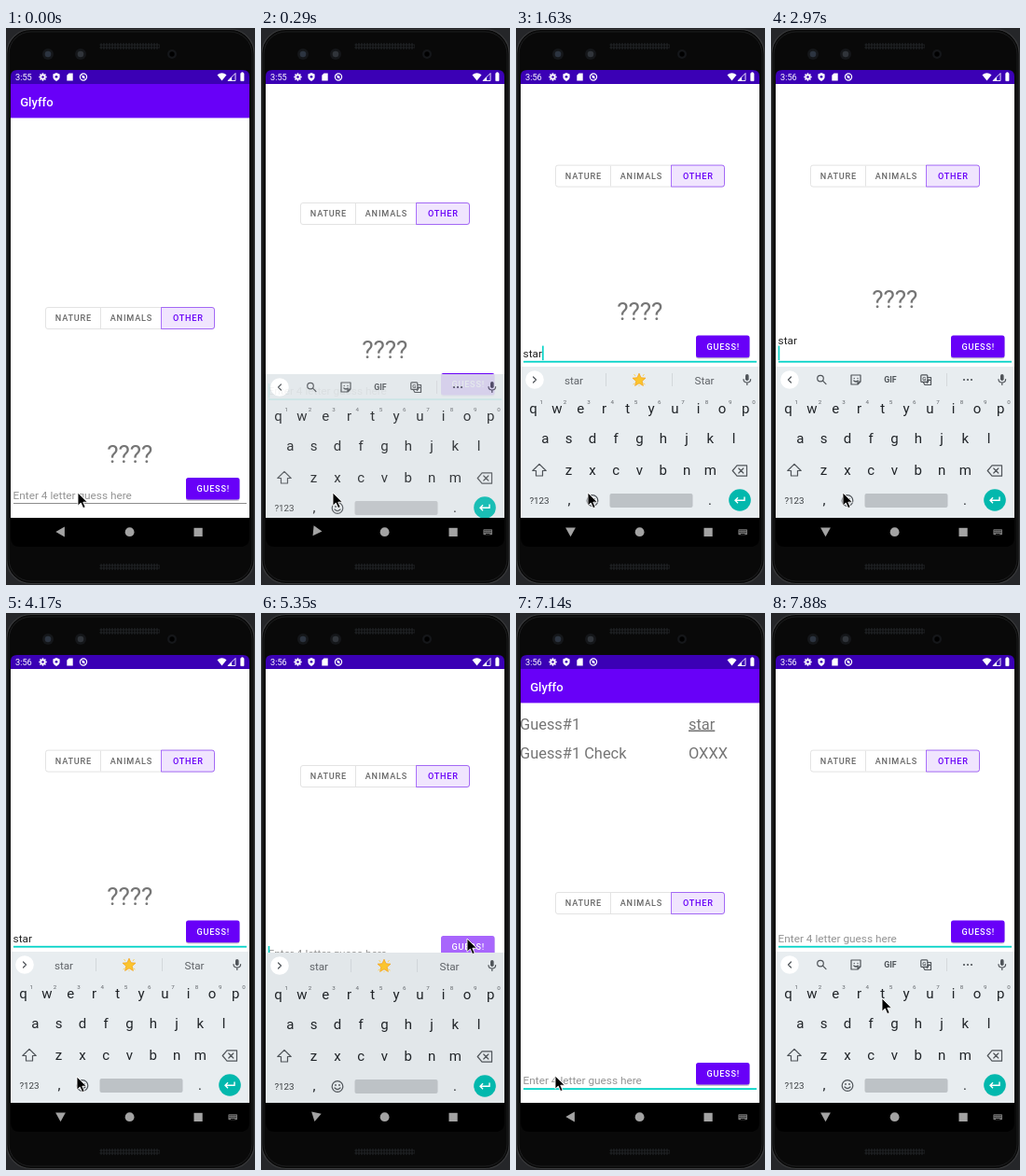
Write an HTML page that moves like this. It is 267x597 px and loops after 8000 ms.

```html
<!DOCTYPE html>
<html lang="en">
<head>
<meta charset="utf-8">
<title>Word guessing app</title>
<style>
  html, body { margin: 0; width: 100%; height: 100%; overflow: hidden; background: #252629; }
  svg { display: block; width: 267px; height: 597px; }
  text { font-family: Roboto, "Noto Sans", sans-serif; white-space: pre; }
  .mid { text-anchor: middle; }
  .caps { font-size: 9.12px; font-weight: 500; letter-spacing: .81px; text-anchor: middle; }
  .entry { font-size: 11.8px; }
  .row { font-size: 16.4px; fill: #757575; }
  .key { font-size: 15px; fill: #202428; text-anchor: middle; }
  .hint { font-size: 6.2px; fill: #5f6368; text-anchor: middle; }
  .word { font-size: 11.7px; fill: #5f6368; text-anchor: middle; }
  .line { fill: none; stroke: #4f5459; stroke-width: 1.2; stroke-linejoin: round; stroke-linecap: round; }
</style>
</head>
<body>
<svg id="stage" viewBox="0 0 267 597"></svg>
<script>
const PURPLE = '#6800f8', TEAL = '#03d3c7', LOOP = 8000;

const text = (x, y, s, cls = '', more = '') => `<text x="${x}" y="${y}" class="${cls}" ${more}>${s}</text>`;
const rect = (x, y, w, h, fill, more = '') => `<rect x="${x}" y="${y}" width="${w}" height="${h}" fill="${fill}" ${more}/>`;
const dot = (x, y, r, fill, more = '') => `<circle cx="${x}" cy="${y}" r="${r}" fill="${fill}" ${more}/>`;
const path = (d, more = 'class="line"') => `<path d="${d}" ${more}/>`;

function body() {
  const grille = y => rect(100, y, 65, 7, 'url(#mesh)', 'rx="3.5"');
  const lens = (x, r, fill) => dot(x, 28, r, '#15171a') + dot(x, 28, r * .55, fill);
  return rect(0, 0, 267, 597, '#252629')
    + rect(.8, 1.5, 265.4, 594, '#090909', 'rx="26" stroke="#3a3b3d" stroke-width="1.2"')
    + rect(3, 4, 261, 589, 'none', 'rx="24" stroke="#1d1e1f"')
    + grille(16) + grille(574)
    + lens(45, 6, '#2c3440') + lens(80, 6, '#30343a') + lens(178, 5, '#000');
}

function statusBar() {
  const white = 'fill="#fff"';
  const teeth = [0, 45, 90, 135].map(a => rect(38.7, 48.3, 1.6, 8.4, '#fff', `transform="rotate(${a} 39.5 52.5)"`)).join('');
  return path('M5 60v-8q0-7 7-7h242q7 0 7 7v8z', 'fill="#3b00b5"')
    + text(10, 55.9, '3:55', '', 'id="clock" font-size="9.2" fill="#fff"')
    + teeth + dot(39.5, 52.5, 3, '#fff') + dot(39.5, 52.5, 1.3, '#3b00b5')
    + path('M54 48l3.6 1.5v2.8q0 3-3.6 4.8q-3.6-1.8-3.6-4.8v-2.8z', white) + dot(54, 52.3, 1.4, '#3b00b5')
    + path('M67.5 48.5h4.2v8h-6.4v-5.8z', white)
    + dot(83, 52.5, 3.6, 'none', 'stroke="#fff" stroke-width="1.2"') + dot(83, 52.5, 1.4, '#fff')
    + path('M80.5 50l5 5', 'stroke="#fff"')
    + path('M231.5 56.5l-5-6.2q5-4.2 10 0z', white)
    + path('M246 48.5v8h-8z', 'fill="none" stroke="#fff" stroke-width=".9"') + path('M242 52.5v4h-4z', white)
    + path('M251.8 48.6h.8v-.8h1.6v.8h.8v8h-3.2z', 'fill="#fff" stroke="#fff" stroke-width=".8"');
}

function appWindow() {
  return rect(5, 60, 256, 620, '#fff')
    + rect(5, 60, 256, 36.4, PURPLE)
    + text(15.2, 83.5, 'Glyffo', '', 'font-size="13.1" font-weight="500" fill="#fff"')
    + '<g id="result">' + text(4, 124.5, 'Guess#1', 'row') + text(185, 124.5, 'star', 'row', 'text-decoration="underline"')
    + text(4, 155.5, 'Guess#1 Check', 'row') + text(185, 155.5, 'OXXX', 'row') + '</g>'
    + rect(42.5, 299.5, 181, 23, '#fff', 'rx="2.5" stroke="#e3e3e3"') + rect(101, 300, 1, 22, '#e3e3e3')
    + path('M166.5 299.5h54.5q2.5 0 2.5 2.5v18q0 2.5-2.5 2.5h-54.5z', `fill="#f0e5fe" stroke="${PURPLE}" stroke-opacity=".6" stroke-width=".9"`)
    + text(72.4, 314.3, 'NATURE', 'caps', 'fill="#686868"') + text(134.4, 314.3, 'ANIMALS', 'caps', 'fill="#686868"')
    + text(195.4, 314.3, 'OTHER', 'caps', `fill="${PURPLE}"`)
    + text(132.8, 465.8, '????', 'mid', 'id="marks" font-size="26" fill="#757575"')
    + text(7.6, 505, '', 'entry', 'id="line1"')
    + rect(0, 493, 1.6, 15.5, TEAL, 'id="caret"')
    + rect(8, 509, 250, 1, '#8c8c8c', 'id="rule"')
    + rect(193, 483.3, 57.5, 23.6, '#000', 'rx="2.5" opacity=".2"')
    + rect(193, 482, 57.5, 23.6, PURPLE, 'rx="2.5" id="button"')
    + text(222.2, 497.2, 'GUESS!', 'caps', 'fill="#fff"');
}

function keyRow(letters, x0, y) {
  return [...letters].map((c, i) => text(x0 + i * 25.3, y, c, 'key')).join('');
}

function keyboard() {
  const hints = [...'1234567890'].map((c, i) => text(27.3 + i * 25.3, 403, c, 'hint')).join('');
  const tools = dot(53, 375.6, 3.3, 'none', 'class="line"') + path('M55.5 378.2l3.5 3.5')
    + path('M86 372h10v7l-3 3h-7zM96 379h-3v3') + dot(89.2, 375.5, .7, '#4f5459') + dot(93, 375.5, .7, '#4f5459') + path('M88.8 378q2.2 2 4.4 0')
    + text(128, 380, 'GIF', 'mid', 'font-size="8.8" font-weight="700" fill="#4f5459"')
    + rect(160.8, 371.8, 7, 7.6, 'none', 'rx="1" class="line"') + text(164.3, 377.8, 'G', 'mid', 'font-size="6" font-weight="700" fill="#4f5459"')
    + path('M168 374.5h3.5v8h-6.5l-1.5-2.5M168 377.5h2.5M169.3 376.5q0 2-2 4')
    + rect(188, 370, .8, 14, '#d0d4d8')
    + [207, 211, 215].map(x => dot(x, 377, 1.1, '#4f5459')).join('');
  const words = text(62, 381.8, '', 'word', 'id="w0"') + text(132, 381.8, '', 'word', 'id="w1"') + text(202, 381.8, '', 'word', 'id="w2"')
    + rect(96, 370, .8, 14, '#cdd2d6') + rect(167, 370, .8, 14, '#cdd2d6')
    + '<g id="star">' + path('M132 370.2l2 4.6 5 .4-3.8 3.3 1.2 4.9-4.4-2.6-4.4 2.6 1.2-4.9-3.8-3.3 5-.4z', 'fill="#fbc52d" stroke="#f5a623" stroke-width=".8" stroke-linejoin="round"')
    + path('M126.5 371l1.5 2M137.5 371l-1.5 2M125.5 382l2-1.2M138.5 382l-2-1.2M132 384v-1', 'stroke="#f9d45c" stroke-width="1"') + '</g>';
  return rect(5, 363, 256, 180, '#e8edf0', 'id="panel"')
    + dot(20, 377, 9.8, '#fff') + path('M21.5 374l-3 3 3 3', 'class="line" id="chevron"')
    + `<g id="tools">${tools}</g><g id="words">${words}</g>`
    + rect(246, 371, 3.6, 7, '#4f5459', 'rx="1.8"') + path('M244 376.5q0 3.5 3.8 3.5t3.8-3.5M247.8 380v2.5')
    + keyRow('qwertyuiop', 18.6, 412.5) + hints
    + keyRow('asdfghjkl', 31.3, 445) + keyRow('zxcvbnm', 56.6, 478.5)
    + path('M25 467.3l-7.2 7.2h3.7v5.5h7v-5.5h3.7z')
    + path('M237 468.8h10.5v11.4h-10.5l-4.8-5.7zM238.8 472l5 5M243.8 472l-5 5')
    + text(25, 509.6, '?123', 'mid', 'font-size="9.8" fill="#3c4043"')
    + text(57, 510.5, ',', 'key') + text(208, 510.5, '.', 'key')
    + dot(82, 506.5, 5.8, 'none', 'class="line"') + dot(80, 505, .9, '#4f5459') + dot(84, 505, .9, '#4f5459') + path('M79 508q3 3.2 6 0')
    + rect(100.5, 499, 89, 15, '#bdc2c6', 'rx="2"')
    + dot(240, 506, 11.8, '#02b8ad')
    + path('M245 502.5v3.8h-9.5M238 503.3l-3 3 3 3', 'fill="none" stroke="#fff" stroke-width="1.4"');
}

function navBar() {
  const gray = '#a3a3a3';
  const keys = [0, 1].map(r => [0, 1, 2, 3].map(c => rect(239.6 + c * 2, 538.2 + r * 2, 1, 1, '#000')).join('')).join('');
  return path('M5 525h256v21q0 10-10 10h-236q-10 0-10-10z', 'fill="#000"')
    + path('M53.3 540l9.6-5.4v10.8z', `id="back" fill="${gray}"`)
    + dot(132.6, 540.2, 4.9, gray) + rect(201.5, 535.8, 9.2, 9.2, gray)
    + `<g id="ime">${rect(238.4, 537.2, 9.6, 6, '#787878', 'rx=".8"')}${keys}${rect(241, 542, 4.4, .8, '#000')}</g>`;
}

const pointer = path('M0 0v14.2l3.3-3.1 2.4 5.5 2.5-1.1-2.4-5.3h4.6z',
  'id="pointer" fill="#000" stroke="#fff" stroke-width=".9" stroke-linejoin="round"');

document.getElementById('stage').innerHTML = `<defs>
  <clipPath id="view"><rect x="5" y="60" width="256" height="465"/></clipPath>
  <pattern id="mesh" width="3" height="3" patternUnits="userSpaceOnUse"><rect width="3" height="3" fill="#1c1e20"/><circle cx="1.5" cy="1.5" r=".9" fill="#050505"/></pattern>
  </defs>${body()}<g clip-path="url(#view)"><g id="win">${appWindow()}</g><g id="kb">${keyboard()}</g></g>${statusBar()}${navBar()}${pointer}`;

const at = id => document.getElementById(id);
const words = {
  s: ['s', 'so', 'S'], st: ['st', 'still', 'St'], sta: ['sta', 'start', 'stay'], star: ['star', '', 'Star']
};

// Each step lists only what changes from the one before.
const steps = [
  [0, { clock: '3:55', pan: 0, kb: 0, drop: 0, back: 0, ime: 0, focus: 0, caret: 0, typed: '', wrap: 0, sug: '', press: 0, done: 0, tip: [77, 498] }],
  [140, { ime: 1, focus: 1 }],
  [290, { pan: 112, kb: .9, drop: 8, back: -55, caret: 1 }],
  [440, { pan: 152.4, kb: 1, drop: 0, back: -90 }],
  [740, { caret: 0 }],
  [1040, { typed: 's', sug: 's', caret: 1 }],
  [1190, { typed: 'st', sug: 'st' }],
  [1340, { typed: 'sta', sug: 'sta', clock: '3:56' }],
  [1490, { typed: 'star' }],
  [1630, { sug: 'star' }],
  [2080, { caret: 0 }],
  [2530, { wrap: 1, caret: 1 }],
  [2670, { caret: 0 }],
  [2970, { caret: 1, sug: '' }],
  [3420, { caret: 0 }],
  [3720, { wrap: 0, caret: 1, sug: 'star' }],
  [4170, { caret: 0, tip: [76, 497] }],
  [4770, { caret: 1, tip: [112, 462] }],
  [4920, { tip: [190, 385] }],
  [5060, { tip: [236, 352] }],
  [5200, { tip: [221, 349], press: 1 }],
  [5350, { pan: 136, drop: 1, back: -78, ime: 0, typed: '', done: 1 }],
  [5500, { pan: 48, kb: .3, drop: 14, back: -25, press: .4, caret: 0 }],
  [5650, { pan: 0, kb: 0, back: 0, press: 0, tip: [190, 360], sug: '' }],
  [5800, { tip: [112, 398] }],
  [5950, { tip: [97, 431] }],
  [6100, { tip: [80, 462] }],
  [6250, { tip: [63, 488], caret: 1 }],
  [6400, { tip: [52, 501] }],
  [6550, { tip: [46, 500] }],
  [6690, { tip: [43, 497], caret: 0 }],
  [6840, { tip: [42, 496] }],
  [7140, { ime: 1 }],
  [7290, { pan: 112, kb: .9, drop: 8, back: -55, tip: [58, 480] }],
  [7440, { pan: 152.4, kb: 1, drop: 0, back: -90, tip: [98, 436] }],
  [7580, { caret: 1, tip: [119, 413] }],
  [7880, { caret: 0 }]
];
const states = [];
steps.reduce((s, [, change]) => (states.push({ ...s, ...change }), states[states.length - 1]), {});

const set = (id, attrs) => { for (const k in attrs) at(id).setAttribute(k, attrs[k]); };
const show = (id, on) => set(id, { visibility: on ? 'inherit' : 'hidden' });

function draw(s) {
  const lift = s.wrap ? 13.5 : 0;
  at('clock').textContent = s.clock;
  set('win', { transform: `translate(0 ${-s.pan})` });
  set('kb', { transform: `translate(0 ${s.drop})`, opacity: s.kb });
  set('back', { transform: `rotate(${s.back} 58.5 540)` });
  show('ime', s.ime);
  show('result', s.done);
  show('marks', !s.done);
  set('marks', { transform: `translate(0 ${-lift})` });
  at('line1').textContent = s.typed || 'Enter 4 letter guess here';
  set('line1', { fill: s.typed ? '#222' : '#949494', y: 505 - lift });
  const end = s.typed && !s.wrap ? at('line1').getComputedTextLength() : 0;
  set('caret', { x: 7.7 + end });
  show('caret', s.caret);
  set('rule', s.focus ? { fill: TEAL, y: 509.2, height: 1.8 } : { fill: '#8c8c8c', y: 509, height: 1 });
  set('button', { fill: s.press === 1 ? '#a866fc' : s.press ? '#8433fa' : PURPLE });
  show('tools', !s.sug);
  show('words', s.sug);
  show('star', s.sug === 'star');
  (words[s.sug] || ['', '', '']).forEach((w, i) => { at('w' + i).textContent = w; });
  set('chevron', { transform: s.sug ? 'rotate(180 20 377)' : '' });
  set('panel', { fill: s.drop ? '#e2e7ea' : '#e8edf0' });
  set('pointer', { transform: `translate(${s.tip})` });
}

let last = -1;
function tick() {
  const t = performance.now() % LOOP;
  const i = steps.filter(([start]) => start <= t).length - 1;
  if (i !== last) draw(states[last = i]);
  requestAnimationFrame(tick);
}
tick();
</script>
</body>
</html>
```
